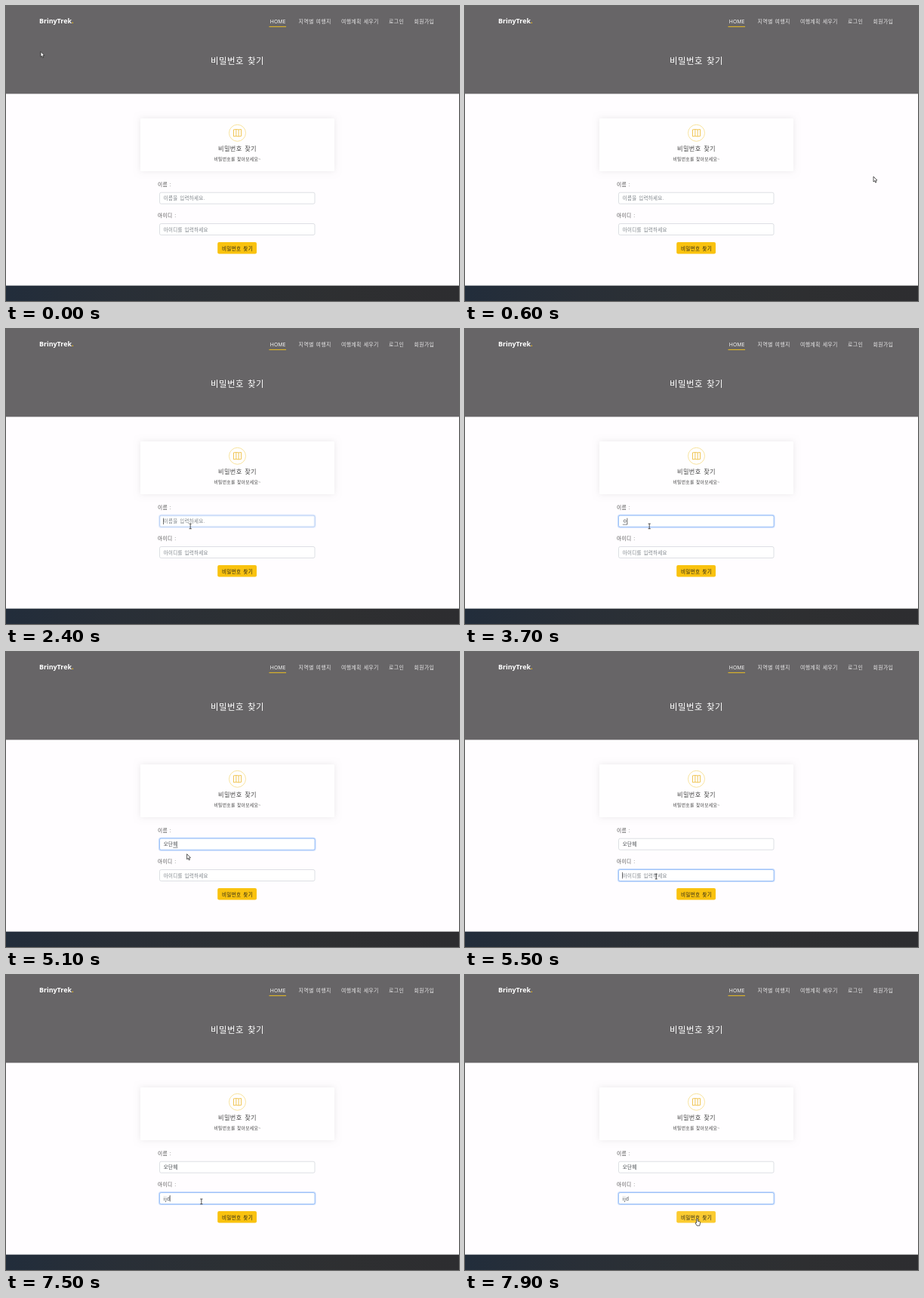
Recreate the animation shown at these times as an HTML page with a canvas. Size 600 by 391 pixels, loop 8 s.

```html
<!DOCTYPE html>
<html lang="ko">
<head>
<meta charset="utf-8">
<title>비밀번호 찾기</title>
<style>
html, body { margin: 0; width: 100%; height: 100%; overflow: hidden; background: #fffdff; }
canvas { display: block; width: 600px; height: 391px; }
</style>
</head>
<body>
<canvas id="stage"></canvas>
<script>
const W = 600, H = 391, MID = 306.5, LOOP = 8000, STEP = 100;
const HEADER_H = 116.4, FOOTER_Y = 370.6;
const canvas = document.getElementById('stage');
const ctx = canvas.getContext('2d');
const dpr = window.devicePixelRatio || 1;
canvas.width = W * dpr;
canvas.height = H * dpr;

const KOREAN = '"Noto Sans CJK KR", "Noto Sans CJK JP", "Noto Sans CJK", sans-serif';
const LATIN = '"Open Sans", "Noto Sans", sans-serif';

const field = y => ({ x: 203.5, y, w: 205.5, h: 15 });
const nameField = field(247.2), idField = field(288.5);
const button = { x: 280.2, y: 313, w: 51.8, h: 15.6 };

const NAME = '오단혜', ID = 'ijd';
const CLICK_NAME = 2400, SLIP = 3200, TYPE_NAME = 3700, CLICK_ID = 5400, TYPE_ID = 6700;
const NAME_PACE = 150, ID_PACE = 200;

// Pointer moves: each starts where the last one ended; bend bows the path sideways
const home = { x: 46, y: 60.5 };
const moves = [
  { from: 0, to: 600, x: 541, y: 226, bend: 0 },
  { from: 1400, to: 1700, x: 309.7, y: 330.5, bend: -50 },
  { from: 1700, to: 2300, x: 244.2, y: 261.4, bend: 0 },
  { from: 5040, to: 5300, x: 253.2, y: 297.6, bend: 9 },
  { from: 7400, to: 7900, x: 307.5, y: 323, bend: 0 }
];

const clamp = v => Math.min(1, Math.max(0, v));
const smooth = k => k * k * (3 - 2 * k);
const inside = (p, r) => p.x >= r.x && p.x <= r.x + r.w && p.y >= r.y && p.y <= r.y + r.h;

function pointerAt(t) {
  let p = home;
  for (const m of moves) {
    if (t < m.from) break;
    const k = clamp((t - m.from) / (m.to - m.from)), e = smooth(k);
    const dx = m.x - p.x, dy = m.y - p.y;
    const bow = Math.sin(Math.PI * k) * m.bend / Math.hypot(dx, dy);
    p = { x: p.x + dx * e - dy * bow, y: p.y + dy * e + dx * bow };
  }
  return p;
}

// Every state of a Hangul word while its letters are typed one by one
function hangulStages(word) {
  const leads = 'ㄱㄲㄴㄷㄸㄹㅁㅂㅃㅅㅆㅇㅈㅉㅊㅋㅌㅍㅎ';
  const stages = [];
  [...word].forEach((ch, i) => {
    const done = word.slice(0, i), code = ch.charCodeAt(0), tail = (code - 0xac00) % 28;
    stages.push(done + leads[Math.floor((code - 0xac00) / 588)]);
    stages.push(done + String.fromCharCode(code - tail));
    if (tail) stages.push(done + ch);
  });
  return stages;
}
const nameStages = hangulStages(NAME);
const idStages = [...ID].map((_, i) => ID.slice(0, i + 1));

function typed(stages, start, pace, t) {
  const i = Math.min(stages.length - 1, Math.floor((t - start) / pace));
  return i < 0 ? '' : stages[i];
}

// The caret blinks from the latest click or key
function caretOn(t) {
  const actions = [CLICK_NAME, SLIP, CLICK_ID];
  nameStages.forEach((_, i) => actions.push(TYPE_NAME + i * NAME_PACE));
  idStages.forEach((_, i) => actions.push(TYPE_ID + i * ID_PACE));
  const last = Math.max(...actions.filter(a => a <= t));
  return (t - last) % 1000 < 500;
}

function setFont(size, weight, font) {
  const korean = font === KOREAN;
  const px = korean ? size * 0.92 : size;
  ctx.font = `${weight} ${px}px ${font}`;
  ctx.letterSpacing = (korean ? px * 0.05 : 0) + 'px';
  ctx.wordSpacing = (korean ? px * 0.15 : 0) + 'px';
}

function text(s, x, cy, size, color, { align = 'left', weight = 400, font = KOREAN } = {}) {
  setFont(size, weight, font);
  ctx.textAlign = align;
  ctx.fillStyle = color;
  ctx.fillText(s, x, cy + size * 0.36);
  return ctx.measureText(s).width;
}

function rect(x, y, w, h, color) {
  ctx.fillStyle = color;
  ctx.fillRect(x, y, w, h);
}

function box(r, radius, fill, stroke, width = 0.7) {
  ctx.beginPath();
  ctx.roundRect(r.x, r.y, r.w, r.h, radius);
  if (fill) { ctx.fillStyle = fill; ctx.fill(); }
  if (stroke) { ctx.strokeStyle = stroke; ctx.lineWidth = width; ctx.stroke(); }
}

function drawHeader() {
  rect(0, 0, W, HEADER_H, '#676567');
  const logo = { weight: 700, font: LATIN };
  const w = text('BrinyTrek', 44, 20, 8.9, '#fff', logo);
  text('.', 44 + w, 20, 8.9, '#f8c314', logo);

  let x = 567.3;
  for (const label of ['회원가입', '로그인', '여행계획 세우기', '지역별 여행지']) {
    x -= text(label, x, 20.7, 7.5, '#e8e7e8', { align: 'right' }) + 13.4;
  }
  text('HOME', 349.8, 20.6, 6.9, '#fff', { font: LATIN, weight: 500 });
  rect(348.5, 26.9, 22.5, 1, '#e9bd22');
  text('비밀번호 찾기', MID, 72.3, 12.4, '#fff', { align: 'center' });
}

function drawCard() {
  ctx.save();
  ctx.shadowColor = 'rgba(0,0,0,.08)';
  ctx.shadowBlur = 9 * dpr;
  box({ x: 178, y: 149, w: 257, h: 70 }, 1, '#fffeff');
  ctx.restore();

  ctx.beginPath();
  ctx.arc(MID, 168.3, 11, 0, Math.PI * 2);
  ctx.strokeStyle = '#f6dc86';
  ctx.lineWidth = 0.8;
  ctx.stroke();

  // Folded map: three panels
  ctx.beginPath();
  for (let i = 0; i < 4; i++) {
    const x = MID - 5 + i * 10 / 3, y = 163.9 - (i % 2) * 0.4;
    ctx.moveTo(x, y);
    ctx.lineTo(x, y + 9);
    if (i < 3) {
      const nextY = 163.9 - ((i + 1) % 2) * 0.4;
      for (const h of [0, 9]) {
        ctx.moveTo(x, y + h);
        ctx.lineTo(x + 10 / 3, nextY + h);
      }
    }
  }
  ctx.strokeStyle = '#efc043';
  ctx.lineWidth = 0.9;
  ctx.stroke();

  text('비밀번호 찾기', MID, 188.5, 8.9, '#444', { align: 'center', weight: 500 });
  text('비밀번호를 찾아보세요~', MID, 202.9, 6.3, '#444', { align: 'center' });
}

function drawField(f, hint, value, focus, caret, composing) {
  box(f, 2, '#fff', '#cfd3d9');
  if (focus) {
    ctx.globalAlpha = focus;
    box(f, 2, null, '#c5dafd', 3);
    box(f, 2, '#fff', '#86b4f5');
    ctx.globalAlpha = 1;
  }
  const cy = f.y + 7.6, x = 208.8;
  if (!value) text(hint, x, cy, 7.03, '#7b8187');
  const w = value ? text(value, x, cy, 7, '#3c4045') : 0;
  if (composing) {
    const last = ctx.measureText(value.slice(-1)).width;
    rect(x + w - last, cy + 4, last, 0.6, '#3c4045');
  }
  if (caret) rect(x + w - 0.5, cy - 4.2, 0.7, 8.4, '#333');
}

function drawFooter() {
  const g = ctx.createLinearGradient(0, 0, W, 0);
  ['#222d3b', '#292f37', '#2c3034', '#2e2f31', '#2d2d30'].forEach((c, i) => g.addColorStop(i / 4, c));
  rect(0, FOOTER_Y, W, H - FOOTER_Y, g);
}

const shapes = {
  beam: 'M-1.6 -3.3H1.6M0 -3.3V3.3M-1.6 3.3H1.6',
  hand: 'M-.9 5.4V.6Q0 -.6 .8 .6V3.3L3.3 3.8Q4.2 4.1 4.1 5.2L3.3 9.2H-.4L-2.4 6Q-2.4 4.7 -.9 5.4',
  arrow: 'M0 0V7L1.6 5.6L2.7 8.1L3.8 7.6L2.8 5.2L4.8 5Z'
};

function drawPointer(p, kind) {
  const shape = new Path2D(shapes[kind]);
  ctx.save();
  ctx.translate(p.x, p.y);
  ctx.lineJoin = 'round';
  ctx.fillStyle = '#fff';
  ctx.strokeStyle = '#222';
  ctx.lineWidth = 0.75;
  ctx.fill(shape);
  ctx.stroke(shape);
  ctx.restore();
}

function draw(t) {
  const p = pointerAt(t);
  const hover = inside(p, button);
  const onName = t >= CLICK_NAME && t < CLICK_ID, onId = t >= CLICK_ID;
  const slip = t >= SLIP && t < SLIP + STEP;
  const name = slip ? 'd' : typed(nameStages, TYPE_NAME, NAME_PACE, t);
  const id = typed(idStages, TYPE_ID, ID_PACE, t);
  const fade = click => clamp((t - click + STEP) / (2 * STEP));

  ctx.setTransform(dpr, 0, 0, dpr, 0, 0);
  rect(0, 0, W, H, '#fffdff');
  drawHeader();
  drawCard();
  text('이름 :', 201, 236, 7.25, '#555');
  text('아이디 :', 201, 277.2, 7.25, '#555');
  drawField(nameField, '이름을 입력하세요.', name, fade(CLICK_NAME) - fade(CLICK_ID),
    onName && caretOn(t), onName && t >= TYPE_NAME);
  drawField(idField, '아이디를 입력하세요', id, fade(CLICK_ID), onId && caretOn(t), false);
  box(button, 2, hover ? '#fbcb31' : '#f9c20f');
  text('비밀번호 찾기', MID, 321.1, 7.15, '#2b2718', { align: 'center' });
  drawFooter();

  const overField = inside(p, nameField) || inside(p, idField);
  drawPointer(p, hover ? 'hand' : overField ? 'beam' : 'arrow');
}

const start = performance.now();
function tick() {
  const t = (performance.now() - start) % LOOP;
  draw(Math.floor(t / STEP) * STEP);
  requestAnimationFrame(tick);
}
tick();
</script>
</body>
</html>
```
